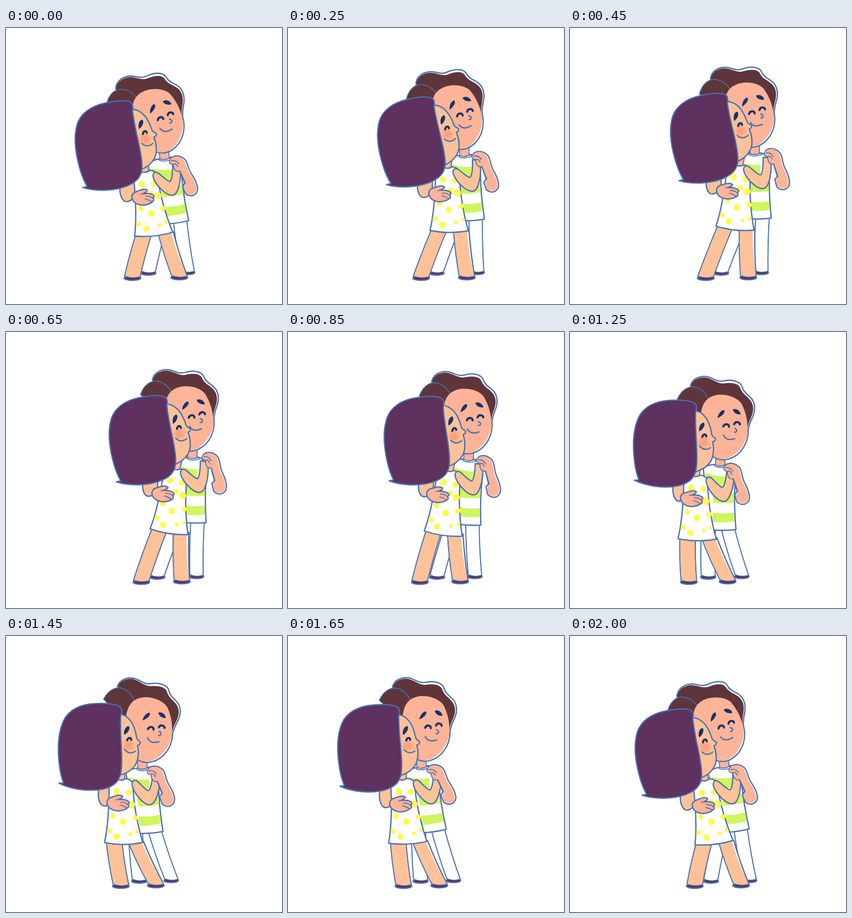
Recreate the animation shown at these times as an HTML page. Size 500 px wide and 500 px high, loop 2.05 s.

```html
<!DOCTYPE html>
<html lang="en">
<head>
<meta charset="utf-8">
<title>Dancing couple</title>
<style>
  html, body { margin: 0; width: 100%; height: 100%; overflow: hidden; background: #fff; }
  svg { display: block; width: 100vw; height: 100vh; }
  .line { fill: none; stroke: #4a6fae; stroke-width: 2.3; stroke-linecap: round; stroke-linejoin: round; }
  .thin { stroke-width: 1.6; }
  .white { fill: #fff; }
  .pink { fill: #ffb498; }
  .peach { fill: #ffc298; }
  .brown { fill: #5e353a; }
  .purple { fill: #5e315f; }
  .lime { fill: #d0f55f; }
  .yellow { fill: #fffa50; }
  .ink { fill: #15336f; }
  .lash { fill: none; stroke: #15336f; stroke-width: 3.8; stroke-linecap: round; }
</style>
</head>
<body>
<svg viewBox="0 0 500 500">
  <defs>
    <radialGradient id="blush">
      <stop offset="0" stop-color="#ff9c78"/>
      <stop offset=".45" stop-color="#ff9c78" stop-opacity=".75"/>
      <stop offset="1" stop-color="#ffb08a" stop-opacity="0"/>
    </radialGradient>
  </defs>

  <g id="hisLegs"></g>

  <g id="shirt">
    <path class="line white" d="M258 247C262 241 270 238 279 237L299 234C309 235 316 245 318 262C320 295 325 322 331 349Q312 354 288 355L270 300Z"/>
    <path class="lime" d="M262 254Q284 259 301 256L301 273Q285 277 270 274Z
      M280 289Q303 289 318 284L321 301Q302 306 284 306Z
      M285 324Q308 324 324 319L326 335Q308 340 287 341Z"/>
    <path class="line pink thin" d="M277 219L279 238Q288 240 296 236L294 216Z"/>
    <path class="line white thin" d="M277 237Q288 241 299 234L301 237Q289 243 278 240Z"/>
  </g>

  <g id="hisHead">
    <path class="line white" d="M199 110C199 97 211 87 227 87C239 88 244 92 255 87C267 81 284 79 290 89C295 99 306 100 314 107C324 117 324 130 321 143Q319 156 321 168L300 180L230 170Z"/>
    <path class="brown" d="M200 110C200 98 212 89 226 89C239 90 247 95 257 91C269 86 283 84 288 93C294 102 304 103 312 110C322 119 321 132 319 143Q317 155 320 168L300 180L228 160Z"/>
    <path class="line brown thin" d="M182 140C185 122 196 110 210 111C222 112 231 118 237 128L228 164Z"/>
    <path class="line white" d="M321 164C326 185 319 208 302 220C294 226 284 228 272 225L262 190Z"/>
    <path class="pink" d="M230 154C227 132 236 119 254 113C271 108 288 111 297 119C309 133 316 147 320 165C323 185 315 206 300 219C293 224 283 227 273 224C252 216 234 188 230 154Z"/>
    <path class="ink" d="M261 155C260 146 265 138 269 138C273 141 268 150 261 155ZM284 133C288 129 297 131 300 138C295 140 287 139 284 133Z"/>
    <path class="lash" d="M275 167C276 160 285 160 285 165M293 158C294 151 303 152 303 156"/>
    <path class="line" d="M296 165C302 166 302 172 297 172M279 182Q287 192 301 183"/>
  </g>

  <g id="herLegs"></g>

  <g id="elbow">
    <path class="line peach" d="M207 283C205 295 207 309 215 314C223 317 232 309 234 300L232 272Z"/>
  </g>

  <g id="dress">
    <path class="peach" d="M243 244L260 242L260 265L243 267Z"/>
    <path class="line thin" d="M258 245L258 262"/>
    <path class="line white" d="M231 267Q242 264 247 261Q254 263 260 258Q269 258 274 264C278 300 288 335 302 370Q269 380 233 377C237 345 235 307 231 267Z"/>
    <g id="dots" class="yellow"></g>
  </g>

  <g id="herArm">
    <path class="line peach" d="M268 263C263 268 270 282 283 294C294 304 305 307 310 296C316 283 318 262 315 247L302 246C302 262 301 275 297 278C291 277 283 268 276 263C273 261 270 261 268 263Z"/>
  </g>

  <g id="hisArm">
    <path class="line white" d="M298 236C305 230 317 230 325 239C330 246 330 255 335 263C343 275 348 286 347 294C344 304 334 307 325 300L320 287L324 281L315 260Z"/>
    <path class="pink" d="M298 237C305 231 315 231 322 239C328 247 328 257 333 265C341 276 346 287 345 294C342 302 334 304 326 299L322 288L326 282L315 259C307 262 303 252 303 248C297 248 295 241 298 237Z"/>
    <path class="line thin" d="M298 237C293 243 297 247 303 247C303 254 307 262 315 259L325 281M299 241Q307 238 313 246M303 247Q308 244 311 251M325 281L320 287"/>
  </g>

  <g id="waist">
    <path class="line pink" d="M228 305C229 298 235 297 240 295C246 292 253 291 256 294C256 297 252 298 249 300C257 299 266 300 268 304Q269 306 266 308Q270 312 265 315C259 320 247 323 238 319C231 316 228 311 228 305Z"/>
    <path class="line thin" d="M249 300Q246 301 244 301M253 305Q260 304 266 308M252 310Q259 311 265 315"/>
  </g>

  <g id="herHead">
    <path class="line peach" d="M228 147C246 148 257 164 263 181Q265 189 271 190Q275 194 268 198C272 207 275 224 269 236C263 247 254 253 244 257L225 200Z"/>
    <circle cx="252" cy="201" r="14" fill="url(#blush)"/>
    <path class="ink" d="M241 183C238 175 242 166 247 166C251 170 247 179 241 183Z"/>
    <path class="lash" d="M248 192C249 185 255 186 255 190"/>
    <path class="line" d="M246 209Q256 218 266 209"/>
    <path class="line purple" d="M222 133C208 130 190 133 171 138C145 146 130 162 127 183C122 209 129 239 135 259C139 272 143 280 147 287L139 289C161 296 195 296 220 286C241 277 248 265 246 244C244 216 233 185 229 149C231 141 229 135 222 133Z"/>
  </g>
</svg>

<script>
const LOOP = 2050, STEP = 50;

// Resting anchor of each part.
const anchors = {
  herHead: [272, 192], hisHead: [290, 186], dress: [267, 373], shirt: [287, 238],
  hisArm: [300, 235], herArm: [302, 303], waist: [248, 307], elbow: [215, 300]
};

// Three shared waves, all zero at rest: side to side, lean back, and lift.
function waves(t) {
  const turn = t / LOOP * 2 * Math.PI;
  const phase = turn - .2 * (1 - Math.cos(turn));
  const sway = Math.sin(phase);
  return [sway, 1 - Math.cos(phase), sway + sway * sway];
}

// Shift in x and y, and turn in degrees, of each part.
const shifts = (sway, lean, lift) => ({
  herHead: [37 * sway + 3 * lean + 11 * lift, -8.2 * lift, 4 * (lean - sway)],
  hisHead: [37 * sway + 5.5 * lean + 5 * lift, 3 * lean - 6.5 * lift, 6.5 * lean - 10 * sway + 6 * lift],
  dress: [42 * sway - 12 * lean, -6 * lift, 4 * lean + 5 * lift],
  shirt: [46 * sway + 2 * lift, 1.5 * lean - 5.5 * lift, 4 * sway + 4.5 * lean],
  hisArm: [45 * sway + 8 * lift, 1.8 * lean - 8.5 * lift, 4 * sway + 3.5 * lean],
  herArm: [39 * sway - 4.5 * lean + 8 * lift, 1.3 * lean - 7 * lift, 2.5 * lean - 2 * sway],
  waist: [39 * sway - 7.4 * lean + 3 * lift, -3 * lean - 5 * lift, 2 * (lean + lift)],
  elbow: [39 * sway - 3.5 * lean + 3 * lift, -5 * lean - 6 * lift, 2 * (lean + lift)]
});

const legs = [
  { box: "hisLegs", on: "shirt", hip: [281, 350], foot: [258, 443], half: 12.5, skin: "white",
    slide: (sway, lean) => 17.5 * sway - lean },
  { box: "hisLegs", on: "shirt", hip: [315, 346], foot: [329, 442], half: 12, skin: "white",
    slide: (sway, lean, lift) => 26 * sway - 5 * lean - 2 * lift },
  { box: "herLegs", on: "dress", hip: [250, 372], foot: [229, 452], half: 14, skin: "peach",
    slide: (sway, lean, lift) => 17 * sway - 4 * lean + 2 * lift },
  { box: "herLegs", on: "dress", hip: [289, 369], foot: [314, 451], half: 14, skin: "peach", gap: 3,
    slide: (sway, lean, lift) => 33 * sway - 10 * lean - 8.5 * lift }
];

const dots = [[246, 283, 6], [268, 282, 5.5], [275, 304, 6.7], [262, 300, 5], [244, 327, 5], [263, 336, 6],
  [284, 327, 4.8], [254, 364, 5.8], [278, 357, 3.5], [240, 355, 4.6], [290, 351, 3.4]];

const byId = id => document.getElementById(id);

function add(parent, tag, attrs) {
  const el = document.createElementNS("http://www.w3.org/2000/svg", tag);
  for (const k in attrs) el.setAttribute(k, attrs[k]);
  return parent.appendChild(el);
}

for (const [cx, cy, r] of dots) add(byId("dots"), "circle", { cx, cy, r });

for (const leg of legs) {
  const box = byId(leg.box);
  leg.shoe = add(box, "ellipse", { class: "line purple", rx: leg.half + 1, ry: leg.half * .3 });
  leg.edge = add(box, "path", { class: "line white" });
  leg.fill = add(box, "path", { class: leg.skin });
}

// Where a point of a part lands after the part's shift and turn.
function follow([ax, ay], [dx, dy, turn], [px, py]) {
  const a = turn * Math.PI / 180, x = px - ax, y = py - ay;
  return [ax + dx + x * Math.cos(a) - y * Math.sin(a), ay + dy + x * Math.sin(a) + y * Math.cos(a)];
}

function legPath(hx, hy, fx, fy, half, gap) {
  const mx = (hx + fx) / 2 - 2, my = (hy + fy) / 2;
  return `M${hx - half} ${hy}Q${mx - half} ${my} ${fx - half} ${fy - 3}Q${fx} ${fy + 2} ${fx + half} ${fy - 2}`
    + `Q${mx + half - gap} ${my} ${hx + half - gap} ${hy}Z`;
}

function draw(t) {
  const now = waves(t), pose = shifts(...now);
  for (const name in pose) {
    const [dx, dy, turn] = pose[name];
    byId(name).setAttribute("transform", `translate(${dx} ${dy}) rotate(${turn} ${anchors[name]})`);
  }
  for (const leg of legs) {
    const [hx, hy] = follow(anchors[leg.on], pose[leg.on], leg.hip);
    const fx = leg.foot[0] + leg.slide(...now), fy = leg.foot[1];
    leg.shoe.setAttribute("cx", fx);
    leg.shoe.setAttribute("cy", fy + 1);
    leg.edge.setAttribute("d", legPath(hx, hy, fx, fy, leg.half, 0));
    leg.fill.setAttribute("d", legPath(hx, hy, fx, fy, leg.half - .8, leg.gap || 0));
  }
}

const start = performance.now();
function tick() {
  const t = (performance.now() - start) % LOOP;
  draw(Math.floor(t / STEP) * STEP);
  requestAnimationFrame(tick);
}
tick();
</script>
</body>
</html>
```
